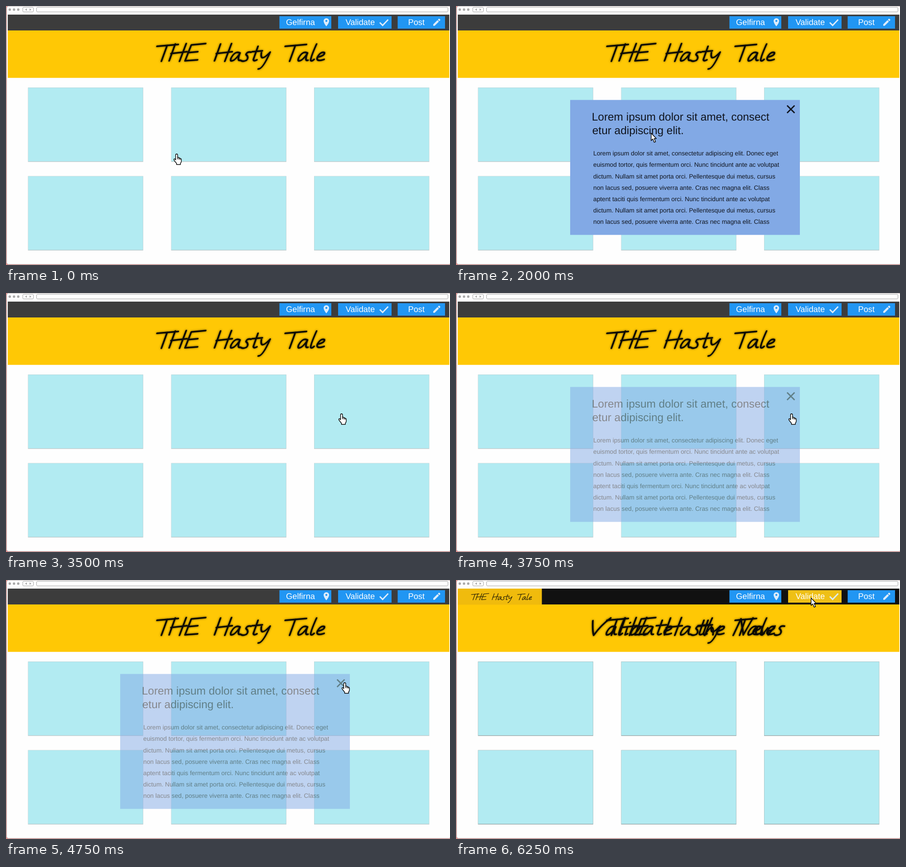
Animation, 980 px wide and 572 px high, one loop 6.5 s. Source, as an HTML page:

```html
<!DOCTYPE html>
<html lang="en">
<head>
<meta charset="utf-8">
<title>News page</title>
<style>
html, body { margin: 0; width: 100%; height: 100%; overflow: hidden; background: #fff; }
svg { display: block; width: 100%; height: 100%; }
text { font-family: "Liberation Sans", Arial, sans-serif; text-rendering: geometricPrecision; }
.chrome { fill: #fff; stroke: #a3a3a3; }
.label { font-size: 18.3px; fill: #fff; }
.icon { fill: #dcecfb; }
.ink { fill: none; stroke: #0b0a05; stroke-width: 3.7; stroke-linecap: round; stroke-linejoin: round; }
.title { filter: drop-shadow(0 0 2px rgba(0, 0, 0, .65)); }
.cursor { fill: #fff; stroke: #000; stroke-width: 1.4; stroke-linejoin: round; }
.head { font-size: 24.4px; }
.body { font-size: 13.73px; }
</style>
</head>
<body>
<svg viewBox="0 0 980 572">
  <rect width="980" height="572" fill="#dd8c8a"/>
  <rect x="1.5" y=".5" width="980" height="570" rx="4" fill="#fefefe" stroke="#b5aeae"/>

  <g fill="#a9a9a9">
    <circle cx="8.3" cy="8" r="2.7"/><circle cx="17.7" cy="8" r="2.7"/><circle cx="27" cy="8" r="2.7"/>
  </g>
  <rect class="chrome" x="37" y="3" width="23.5" height="10" rx="2"/>
  <path d="M46 5.5V10.5L42 8ZM52 5.5V10.5L56 8Z" fill="#a3a3a3"/>
  <rect class="chrome" x="67.5" y="3" width="908" height="10" rx="2"/>

  <rect id="nav" x="4" y="19" width="974.5" height="35.5"/>
  <rect x="4" y="54" width="974.5" height="104.7" fill="#ffc805"/>

  <g fill="#2196f3">
    <rect x="603.5" y="22.5" width="114.5" height="27.5"/>
    <rect id="validate" x="733" y="22.5" width="118" height="27.5"/>
    <rect x="864.5" y="22.5" width="104.5" height="27.5"/>
  </g>
  <text class="label" x="618" y="42.3">Gelfirna</text>
  <text class="label" x="749.5" y="42.3">Validate</text>
  <text class="label" x="887.5" y="42.3">Post</text>
  <path class="icon" fill-rule="evenodd" d="M707 45Q701 37.5 701 33A6.1 6.1 0 0 1 713.2 33Q713.2 37.5 707 45ZM707.1 30.8a2.2 2.2 0 1 0 .01 0Z"/>
  <path d="M825 36.5L831.3 42.8 843.5 30" fill="none" stroke="#dcecfb" stroke-width="3"/>
  <path class="icon" d="M943 40.5L952.3 31.2 955.5 34.4 946.2 43.7H943ZM953.2 30.3L955.2 28.3Q956 27.7 956.7 28.3L958.4 30Q959 30.7 958.4 31.4L956.4 33.5Z"/>

  <g id="cards"></g>

  <g id="tab">
    <rect x="4" y="19" width="185.5" height="35.5" fill="#f0bb0d"/>
    <g id="mini" class="ink" opacity=".85" transform="translate(-86) scale(.36)"></g>
  </g>
  <g id="paper" class="ink title"></g>
  <g id="next" class="ink title"></g>

  <g id="popup" fill="#10151f">
    <rect x="252" y="207.5" width="507" height="298" fill="#82a9e5"/>
    <path d="M730.8 219.8L747.3 236.3M747.3 219.8L730.8 236.3" stroke="#10151f" stroke-width="2.9"/>
  </g>

  <g id="hand" class="cursor">
    <path d="M4.5 14V3Q4.5 .8 6.6 .8 8.8 .8 8.8 3V8.5Q11.3 7.6 12 9.6 14 8.9 14.6 10.9 17 10.6 17 13V17Q16.8 19.6 15 21.5V24.3H6.5V21.8L1.2 15Q-.2 12.4 1.4 11.6 2.8 11.2 4.5 14Z"/>
    <path d="M8.8 8.5V12.5M12 9.6V13M14.6 10.9V13.5" fill="none"/>
  </g>
  <path id="arrow" class="cursor" d="M.7.7V17.2L4.4 13.8 7.4 21 10.5 19.8 7.5 12.7H12.2Z"/>
</svg>
<script>
const NS = "http://www.w3.org/2000/svg";
const $ = id => document.getElementById(id);

function add(parent, tag, attrs, text = "") {
  const el = document.createElementNS(NS, tag);
  for (const key in attrs) el.setAttribute(key, attrs[key]);
  el.textContent = text;
  parent.append(el);
  return el;
}

// Handwriting: advance and pen strokes, baseline at 0
const bowl = "M18-18Q6-24 1-7Q0 3 9-3Q15-9 18-18";
const pen = {
  T: [35, "M0-33L46-37M22-35L18 0"],
  H: [34, "M4-38L0-1M28-39L23 0M0-17L34-21"],
  E: [40, "M37-39L6-36 1-1 28-3M3-19L24-21"],
  V: [36, "M0-32Q5-8 10 0Q20-22 38-38"],
  N: [40, "M0 0L8-36 22-1 34-38"],
  a: [25, bowl + "Q15 0 23-2"],
  d: [28, bowl + "M27-39L20-1"],
  e: [18, "M2-9Q18-12 15-19Q6-22 2-9Q1 2 18-4"],
  h: [24, "M8-38L1 0Q14-34 19-1"],
  i: [14, "M4-18L3-1 8-3M7-27L8-28"],
  l: [15, "M8-38Q2-8 4-2Q7 1 11-4"],
  s: [19, "M17-20Q8-22 7-15Q16-8 11-2Q6 1 0-1"],
  t: [19, "M10-33L7-4Q9 1 15-3M0-21L22-23"],
  w: [33, "M0-19L6-1 14-16 19-1 29-20"],
  y: [25, "M2-19Q4 4 21-20Q14 18 4 17"]
};

function write(parent, word, x) {
  for (const ch of word) {
    const [advance, d] = pen[ch];
    add(parent, "path", { d, transform: `translate(${x} 122) skewX(-14)` });
    x += advance;
  }
}

for (const id of ["paper", "mini"]) {
  write($(id), "THE", 325);
  write($(id), "Hasty", 460);
  write($(id), "Tale", 608);
}
write($("next"), "Validate", 294);
write($("next"), "the", 529);
write($("next"), "News", 612);

for (const y of [180, 375.6])
  for (const x of [48.5, 364.5, 680]) {
    add($("cards"), "rect", { x, y, width: 254.3, height: 164.3 });
    add($("cards"), "rect", { x: x + .5, y: y + .5, width: 253.3, height: 162.5, fill: "#b2ebf2" });
  }

["Lorem ipsum dolor sit amet, consect", "etur adipiscing elit."].forEach((line, i) =>
  add($("popup"), "text", { class: "head", x: i ? 300.8 : 299.8, y: 252.5 + 30.3 * i }, line));

[
  "Lorem ipsum dolor sit amet, consectetur adipiscing elit. Donec eget",
  "euismod tortor, quis fermentum orci. Nunc tincidunt ante ac volutpat",
  "dictum. Nullam sit amet porta orci. Pellentesque dui metus, cursus",
  "non lacus sed, posuere viverra ante. Cras nec magna elit. Class",
  "aptent taciti quis fermentum orci. Nunc tincidunt ante ac volutpat",
  "dictum. Nullam sit amet porta orci. Pellentesque dui metus, cursus",
  "non lacus sed, posuere viverra ante. Cras nec magna elit. Class"
].forEach((line, i) =>
  add($("popup"), "text", { class: "body", x: 303, y: 330.2 + 25.2 * i }, line));

// One row per step: cursor, x, y, popup opacity
const STEP = 250;
const steps = [
  ["hand", 370, 326, 0], ["hand", 333, 316, 0], ["hand", 301, 299, 0], ["hand", 272, 268, 0],
  ["arrow", 268, 262, 0], ["arrow", 268, 262, .58], ["arrow", 268, 262, 1],
  ["arrow", 300, 268, 1], ["arrow", 430, 280, 1], ["arrow", 580, 264, 1], ["arrow", 700, 238, 1],
  ["hand", 736, 225, .47], ["hand", 724, 250, .1], ["hand", 706, 281, 0], ["hand", 734, 266, 0],
  ["hand", 734, 266, .5], ["hand", 738, 242, 1], ["hand", 741, 226, 1], ["hand", 741, 226, 1],
  ["hand", 741, 226, .5], ["arrow", 649, 156, 0], ["arrow", 622, 121, 0], ["arrow", 768, 70, 0],
  ["arrow", 790, 28, 0], ["arrow", 783, 39, 0], ["arrow", 783, 39, 0]
];
const HOVER = 24, SWITCH = 25;

const show = (id, on) => $(id).setAttribute("visibility", on ? "visible" : "hidden");

function draw(n) {
  const [cursor, x, y, alpha] = steps[n];
  const switching = n >= SWITCH;
  show("hand", cursor === "hand");
  show("arrow", cursor === "arrow");
  $(cursor).setAttribute("transform", `translate(${x} ${y})`);
  $("popup").setAttribute("opacity", alpha);
  $("validate").setAttribute("fill", n >= HOVER ? "#efc016" : "#2196f3");
  $("nav").setAttribute("fill", switching ? "#111" : "#3c3c3c");
  $("cards").setAttribute("fill", switching ? "#96a3a4" : "#bcc8c9");
  show("tab", switching);
  show("next", switching);
}

const start = performance.now();
function tick() {
  const t = Math.max(0, performance.now() - start);
  draw(Math.floor(t / STEP) % steps.length);
  requestAnimationFrame(tick);
}
tick();
</script>
</body>
</html>
```
